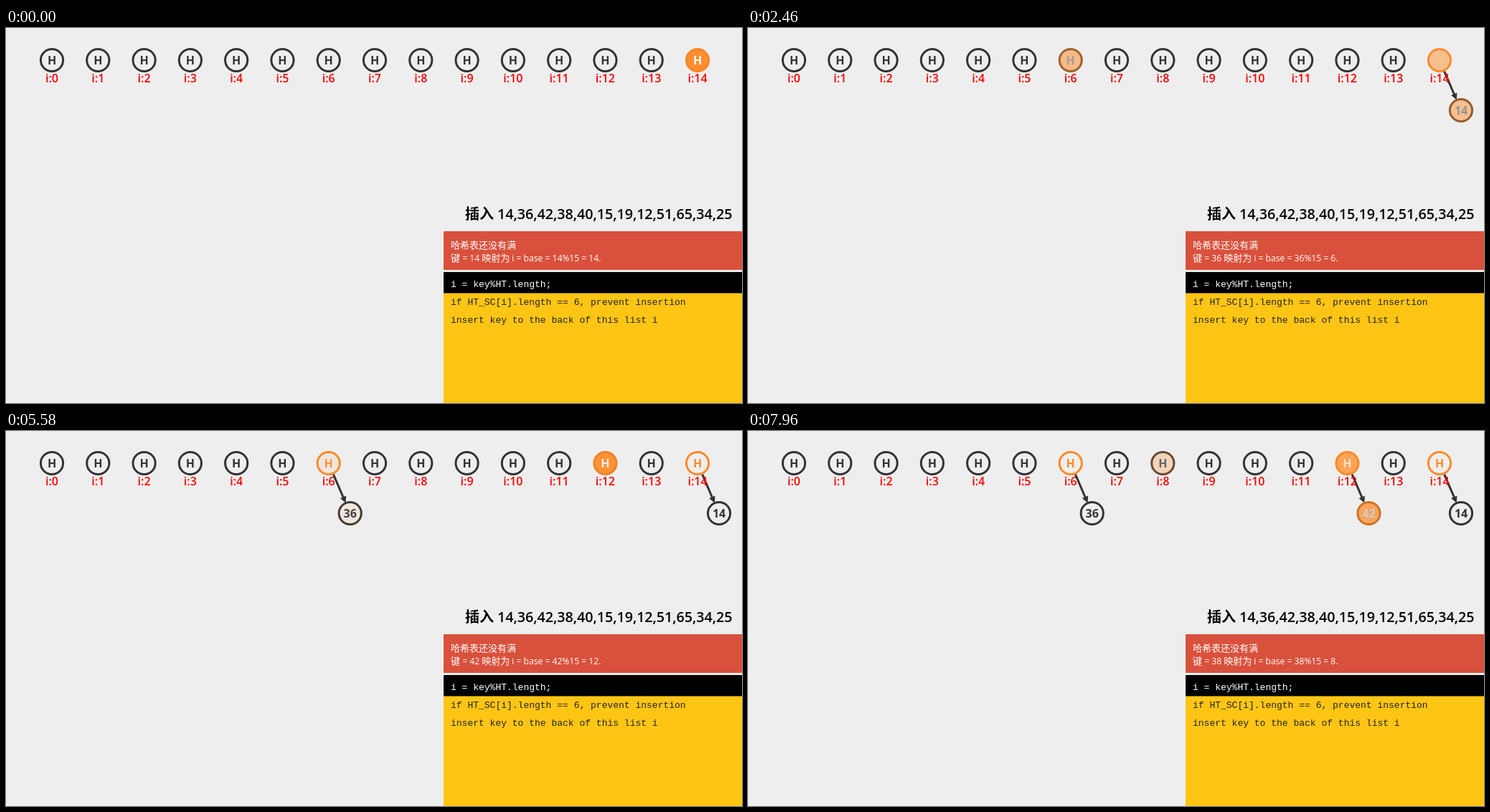
These frames come from a looping animation (1026 px wide and 524 px high, 8 s). An HTML page:

```html
<!DOCTYPE html>
<html lang="zh">
<head>
<meta charset="utf-8">
<title>Hash table insertion</title>
<style>
  html, body { margin: 0; width: 100%; height: 100%; overflow: hidden; background: #eee; }
  svg { display: block; width: 1026px; height: 524px; font-family: "Open Sans", "Noto Sans", sans-serif; }
  .key { font-size: 16px; font-weight: 700; text-anchor: middle; }
  .index { font-size: 16px; font-weight: 600; text-anchor: middle; fill: #f00; }
  .cjk { font-family: "Noto Sans CJK SC", "Noto Sans CJK", sans-serif; font-size: 13px; }
  .message { font-size: 12.1px; fill: #fff; }
  .code { font: 13px "Liberation Mono", "Courier New", monospace; white-space: pre; }
  .title { font-size: 19.7px; font-weight: 600; }
  .title.cjk { font-size: 20px; font-weight: 700; }
</style>
</head>
<body>
<svg id="stage" viewBox="0 0 1026 524"></svg>
<script>
const LOOP = 8000;
const FIRST = 360, STEP = 1412, FADE = 1350;
const SLOTS = 15;
const KEYS = [14, 36, 42, 38];
const CODE = [
  "i = key%HT.length;",
  "if HT_SC[i].length == 6, prevent insertion",
  "insert key to the back of this list i",
];

// Colours as [fill, stroke, text]
const BG = [238, 238, 238], DARK = [51, 51, 51], ORANGE = [255, 138, 39], WHITE = [255, 255, 255];
const NORMAL = [BG, DARK, DARK];
const ACTIVE = [ORANGE, ORANGE, WHITE];
const DONE = [BG, ORANGE, ORANGE];

const stage = document.getElementById("stage");

function add(parent, tag, attrs = {}, text = "") {
  const el = document.createElementNS("http://www.w3.org/2000/svg", tag);
  for (const name in attrs) el.setAttribute(name, attrs[name]);
  el.textContent = text;
  parent.append(el);
  return el;
}

const place = (x, y, scale = 1) => `translate(${x} ${y}) scale(${scale})`;
const slotX = i => 64 + i * 900 / 14;

function makeCircle(parent, x, y, label) {
  const group = add(parent, "g", { transform: place(x, y) });
  const ring = add(group, "circle", { r: 15.6, "stroke-width": 3 });
  const text = add(group, "text", { class: "key", y: 5.6 }, label);
  return { x, y, group, ring, text };
}

function paint(circle, from, to, p) {
  const [fill, stroke, ink] = from.map((a, i) =>
    `rgb(${a.map((v, c) => Math.round(v + (to[i][c] - v) * p))})`);
  circle.ring.setAttribute("fill", fill);
  circle.ring.setAttribute("stroke", stroke);
  circle.text.setAttribute("fill", ink);
}

// Layers: arrows lie under circles, index labels on top
const arrowLayer = add(stage, "g");
const circleLayer = add(stage, "g");
const labelLayer = add(stage, "g");

const heads = Array.from({ length: SLOTS }, (_, i) => {
  add(labelLayer, "text", { class: "index", x: slotX(i), y: 76 }, "i:" + i);
  const head = makeCircle(circleLayer, slotX(i), 45, "H");
  paint(head, NORMAL, NORMAL, 0);
  return head;
});

const ANGLE = Math.atan2(70, 30) * 180 / Math.PI;
const ARROW_START = 17, ARROW_LENGTH = 43.5;

const items = KEYS.map((key, n) => {
  const slot = key % SLOTS, x = slotX(slot);
  const arrow = add(arrowLayer, "g", { transform: `${place(x, 45)} rotate(${ANGLE})` });
  return {
    key, slot,
    head: heads[slot],
    node: makeCircle(circleLayer, x + 30, 115, key),
    arrow,
    shaft: add(arrow, "path", { stroke: "#333", "stroke-width": 3 }),
    tip: add(arrow, "path", { d: "M-9-4.5L0 0L-9 4.5Z", fill: "#333" }),
    hashAt: FIRST + (2 * n - 1) * STEP,
    appendAt: FIRST + 2 * n * STEP,
    leaveAt: FIRST + (2 * n + 1) * STEP,
  };
});

// Panels
add(stage, "text", { class: "title cjk", x: 640, y: 267 }, "插入");
add(stage, "text", { class: "title", x: 685, y: 267 }, "14,36,42,38,40,15,19,12,51,65,34,25");
add(stage, "rect", { x: 610, y: 284, width: 416, height: 54, fill: "#d9513c" });
add(stage, "rect", { x: 610, y: 341, width: 416, height: 183, fill: "#fec515" });
const bar = add(stage, "rect", { x: 610, width: 416, fill: "#000" });
const messages = [0, 1].map(() => add(stage, "text", { class: "message", x: 620 }));
const codeLines = CODE.map((line, i) => add(stage, "text", { class: "code", x: 620, y: 362 + 25 * i }, line));

function setMessage(line, text, y) {
  line.innerHTML = text.replace(/[\u4e00-\u9fff]+/g, run => `<tspan class="cjk">${run}</tspan>`);
  line.setAttribute("y", y);
}

let shown = null;
function showPanel(phase) {
  if (phase === shown) return;
  shown = phase;
  const { key, slot } = items[phase >> 1];
  const appending = phase % 2 === 1;
  if (appending) {
    setMessage(messages[0], `We append ${key} to the back of Doubly Linked List ${slot}`, 307);
    setMessage(messages[1], "This is O(1) with tail pointer", 324);
  } else {
    setMessage(messages[0], "哈希表还没有满", 308);
    setMessage(messages[1], `键 = ${key} 映射为 i = base = ${key}%15 = ${slot}.`, 326);
  }
  bar.setAttribute("y", appending ? 395.5 : 341);
  bar.setAttribute("height", appending ? 25 : 29.5);
  codeLines.forEach((line, i) => line.setAttribute("fill", i === (appending ? 2 : 0) ? "#fff" : "#222"));
}

// Cubic ease in and out from a start time
function progress(t, start) {
  const u = Math.min(1, Math.max(0, (t - start) / FADE));
  return u < 0.5 ? 4 * u ** 3 : 1 - 4 * (1 - u) ** 3;
}

function draw(t) {
  showPanel(Math.floor((t - FIRST) / STEP) + 1);
  for (const { head, node, arrow, shaft, tip, hashAt, appendAt, leaveAt } of items) {
    const leaving = t >= leaveAt, leave = progress(t, leaveAt);
    if (leaving) paint(head, ACTIVE, DONE, leave);
    else paint(head, NORMAL, ACTIVE, progress(t, hashAt));

    const grow = progress(t, appendAt);
    const visibility = grow > 0 ? "visible" : "hidden";
    node.group.setAttribute("visibility", visibility);
    arrow.setAttribute("visibility", visibility);
    node.group.setAttribute("transform", place(node.x, node.y, grow));
    if (leaving) paint(node, ACTIVE, NORMAL, leave);
    else paint(node, NORMAL, ACTIVE, grow);

    const end = ARROW_START + ARROW_LENGTH * grow;
    shaft.setAttribute("d", `M${Math.min(ARROW_START, end - 5)} 0H${end - 5}`);
    tip.setAttribute("transform", place(end, 0));
  }
}

let start = null;
function tick(now) {
  start ??= now;
  draw((now - start) % LOOP);
  requestAnimationFrame(tick);
}
draw(0);
requestAnimationFrame(tick);
</script>
</body>
</html>
```
